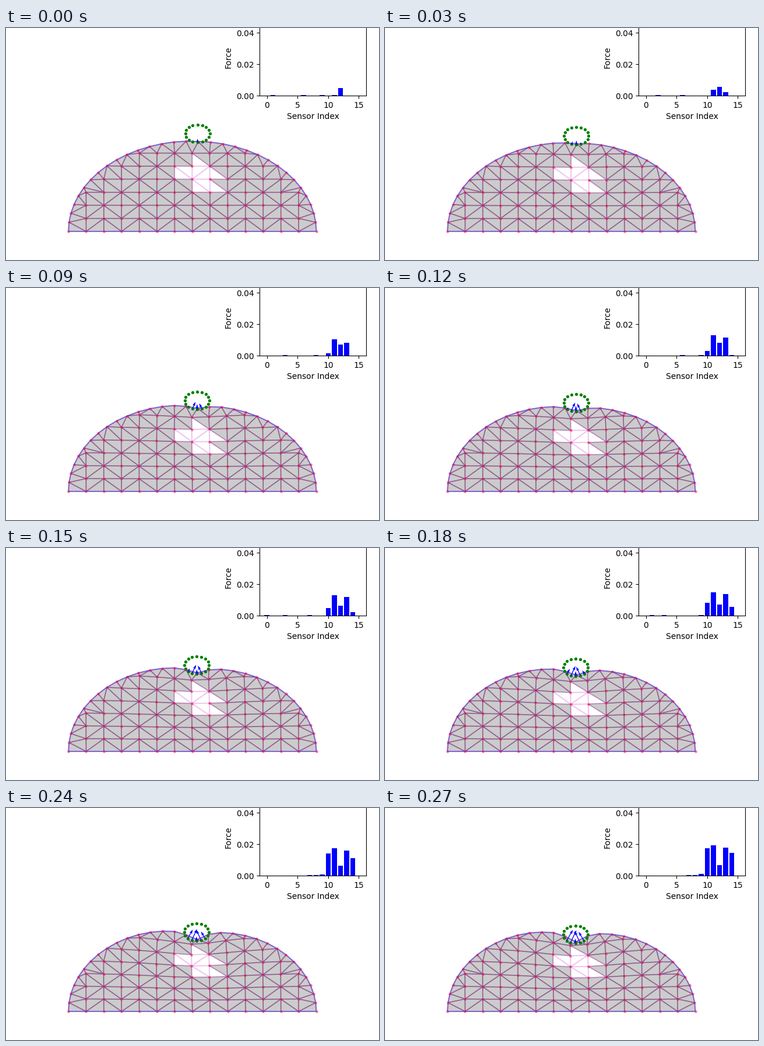
These frames come from a looping animation (640 px wide and 398 px high, 0.3 s). A matplotlib script:

```python
import numpy as np
import matplotlib.pyplot as plt
from matplotlib.animation import FuncAnimation
from matplotlib.collections import LineCollection, PolyCollection
from matplotlib.tri import Triangulation

W, H, DPI = 640, 398, 100
FRAMES, INTERVAL = 10, 30

# Half-disc mesh: centre, radii and grid spacing in pixels
CX, BASE, RX, RY = 320.3, 349.0, 212.7, 155.3
COLS, DX, DY = 14, 2 * 212.7 / 14, 22.4
ROW_START = [0, 1, 1, 1, 2, 3, 4]
ARC = 31

FULL_HOLES = {(6, 4), (7, 4), (7, 3)}
HALF_HOLES = {(7, 5), (8, 4), (8, 3)}

# Bar heights of sensors 10 to 14 at key steps
KEY_STEPS = [0, 2, 4, 5, 6, 7, 9]
KEY_FORCES = np.array([
    [0, 0, 50, 0, 0],
    [0, 78, 63, 48, 0],
    [30, 130, 80, 115, 3],
    [48, 130, 63, 118, 22],
    [80, 147, 70, 137, 55],
    [107, 155, 58, 143, 77],
    [175, 192, 66, 178, 145],
]) * 1e-4
NOISE = [(1, 6, 9, 11), (2, 6), (2, 3, 7), (3, 8), (6, 9),
         (0, 3, 7), (1, 3, 9), (7, 8, 9), (7, 8, 9), (7, 8)]
LEAN = np.radians([30, 25, 0, -25, -31])
ARROW_SCALE = 1230


def rising(c, r):
    """True if the diagonal of a grid cell goes up to the right."""
    if r < 2:
        return c % 2 == 1 and (c, r) != (7, 1)
    flip = (r == 4 and c >= 6) or (r == 5 and c >= 7) or (c, r) == (7, 3)
    return ((c + r) % 2 == 0) != flip


def build_mesh():
    pts, index = [], {}
    for r, start in enumerate(ROW_START):
        for c in range(start, COLS + 1 - start):
            index[c, r] = len(pts)
            pts.append((CX - RX + c * DX, BASE - r * DY))
    first = len(pts)
    for a in np.pi * np.arange(1, ARC) / ARC:
        pts.append((CX - RX * np.cos(a), BASE - RY * np.sin(a)))
    pts = np.array(pts)
    rim = [index[0, 0], *range(first, len(pts)), index[COLS, 0]]

    solid, hollow, cells = [], [], []
    for (c, r), bl in index.items():
        corners = [(c + 1, r), (c + 1, r + 1), (c, r + 1)]
        if not all(k in index for k in corners):
            continue
        br, tr, tl = (index[k] for k in corners)
        cells.append({bl, br, tr, tl})
        if rising(c, r):
            low, high = (bl, br, tr), (bl, tr, tl)
        else:
            low, high = (bl, br, tl), (br, tr, tl)
        full = (c, r) in FULL_HOLES
        (hollow if full or (c, r) in HALF_HOLES else solid).append(low)
        (hollow if full else solid).append(high)

    # Fill the band between grid and arc
    unit = (pts - [CX, BASE]) / [RX, RY]
    for t in Triangulation(*unit.T).triangles:
        u, v = unit[t[1]] - unit[t[0]], unit[t[2]] - unit[t[0]]
        area = abs(u[0] * v[1] - u[1] * v[0])
        if area > 1e-5 and not any(set(t) <= cell for cell in cells):
            solid.append(tuple(t))

    edges = {tuple(sorted((t[i], t[i - 1])))
             for t in solid + hollow for i in range(3)}
    bottom = [index[c, 0] for c in range(COLS, -1, -1)]
    return (pts, np.array(solid), np.array(sorted(edges)),
            np.array(rim + bottom))


def deform(pts, s):
    """Push the mesh down under the ring; s runs from 0 to 1."""
    x, y = pts.T
    h = BASE - y
    depth = RY - h
    d = x - 328
    spread = 1 / (1 + (d / (82 + 0.35 * depth)) ** 2)
    dent = np.exp(-((x - 330) / 21) ** 2 - np.maximum(depth, 0) / 13)
    dy = 0.145 * h * s * spread + (1 + 12.5 * s) * dent
    q = d / 70
    pull = 4.5 * 2 * q / (1 + q * q) * (h / RY) ** 6
    # Sideways drift is quick at first, then slows
    drift = 1 - 0.75 * (1 - s) ** 1.8
    dx = -drift * (2.5 * spread * h / RY + pull)
    return np.column_stack([x + dx, y + dy])


def ring(step):
    a = 2 * np.pi * np.arange(16) / 16
    return np.column_stack([329 - 0.22 * step + 21 * np.cos(a),
                            181 + 4 * step - 15 * np.sin(a)])


def forces(step):
    f = np.zeros(16)
    f[list(NOISE[step])] = 0.0003
    if step >= 8:
        f[9] = 0.001 if step == 9 else 0.0006
    main = [np.interp(step, KEY_STEPS, col) for col in KEY_FORCES.T]
    f[10:15] = np.maximum(f[10:15], main)
    return f


fig = plt.figure(figsize=(W / DPI, H / DPI), dpi=DPI, facecolor="white")

stage = fig.add_axes([0, 0, 1, 1])
stage.set_xlim(0.5, W + 0.5)
stage.set_ylim(H, 0)
stage.axis("off")

nodes, solid, edges, outline = build_mesh()
faces = PolyCollection(nodes[solid], facecolors=[(0, 0, 0, 0.2)],
                       edgecolors=[(0, 0, 0, 0.27)], linewidths=1,
                       zorder=1)
wires = LineCollection(nodes[edges], colors=[(0.79, 0.28, 0.79, 0.3)],
                       linewidths=1.5, zorder=2)
stage.add_collection(faces, autolim=False)
stage.add_collection(wires, autolim=False)
border, = stage.plot([], [], color=(0, 0, 1, 0.3), lw=1.5, zorder=3)
dots = stage.scatter(*nodes.T, s=11, color=[(1, 0, 0.25, 0.5)], lw=0,
                     zorder=4)
probe = stage.scatter(*ring(0).T, s=14.5, color="green", lw=0, zorder=5)
arrows = stage.quiver(*ring(0)[10:15].T, np.zeros(5), np.zeros(5),
                      color="blue", angles="xy", scale_units="xy", scale=1,
                      units="dots", width=1.3, headwidth=3.5, headlength=5.5,
                      headaxislength=5, minlength=0, zorder=6)

chart = fig.add_axes([435 / W, 1 - 116 / H, 183 / W, 131 / H])
bars = chart.bar(range(16), np.zeros(16), color="blue")
chart.set_xlim(-1.19, 16.19)
chart.set_ylim(0, 0.0487)
chart.set_xticks([0, 5, 10, 15])
chart.set_yticks([0, 0.02, 0.04], ["0.00", "0.02", "0.04"])
chart.set_xlabel("Sensor Index")
chart.set_ylabel("Force")


def draw(step):
    pts = deform(nodes, step / (FRAMES - 1))
    faces.set_verts(pts[solid])
    wires.set_segments(pts[edges])
    border.set_data(*pts[outline].T)
    dots.set_offsets(pts)

    circle, f = ring(step), forces(step)
    probe.set_offsets(circle)
    arrows.set_offsets(circle[10:15])
    length = ARROW_SCALE * np.where(f[10:15] > 0.001, f[10:15], 0)
    arrows.set_UVC(length * np.sin(LEAN), -length * np.cos(LEAN))
    for bar, height in zip(bars, f):
        bar.set_height(height)
    return faces, wires, border, dots, probe, arrows, *bars


anim = FuncAnimation(fig, draw, frames=FRAMES, interval=INTERVAL,
                     repeat=True, repeat_delay=0, blit=False)
plt.show()
```
